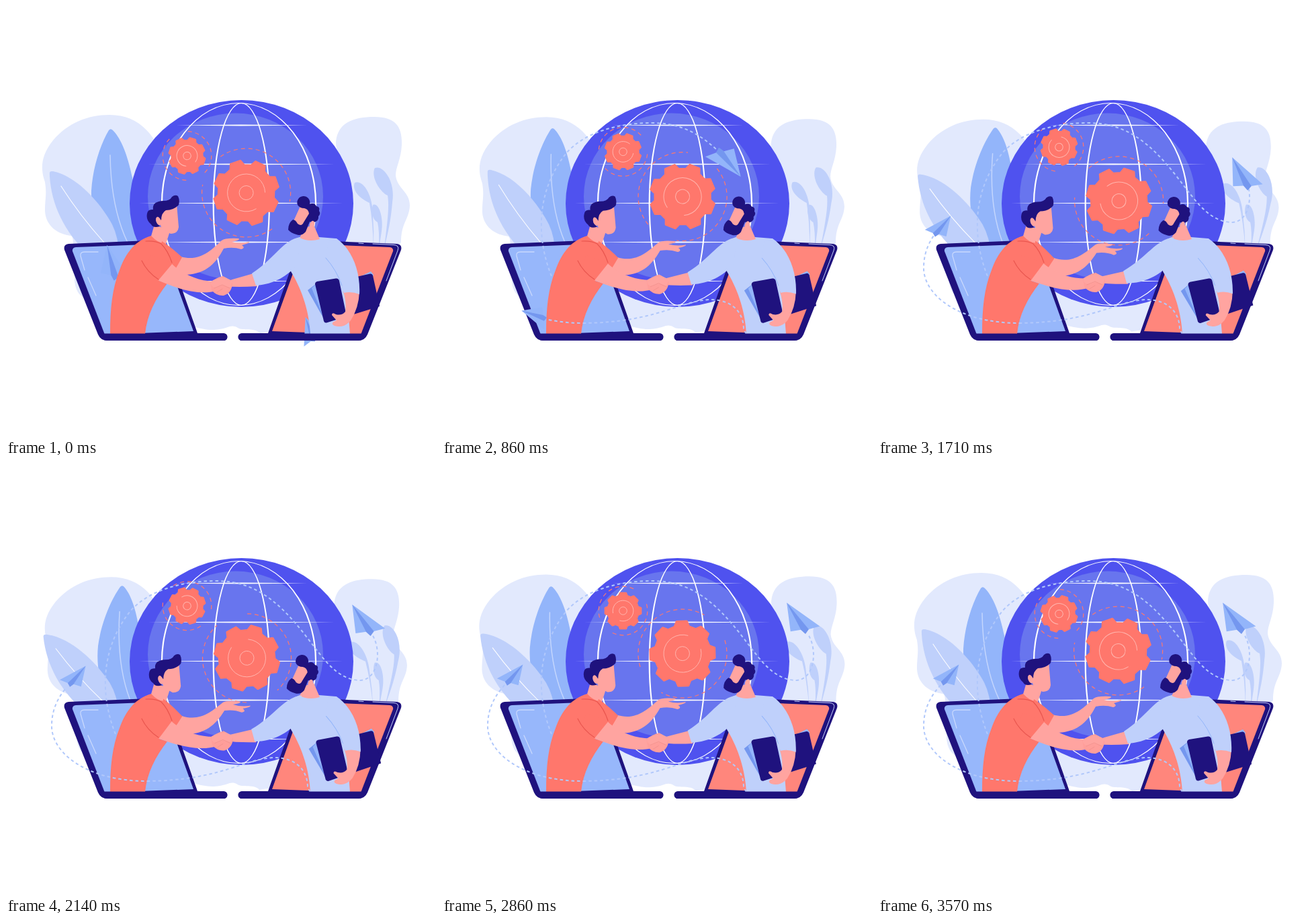
Write an HTML page that moves like this. It is 640 px wide and 640 px high and loops after 3.64 s.

```html
<!DOCTYPE html>
<html lang="en">
<head>
<meta charset="utf-8">
<title>Online deal</title>
<style>
  html, body { margin: 0; width: 100%; height: 100%; overflow: hidden; background: #fff; }
  svg { display: block; width: 100vw; height: 100vh; }
  .line { fill: none; stroke-linecap: round; }
  .navy { fill: #1f127e; }
  .coral { fill: #ff776c; }
  .skin { fill: #ffa4a0; }
  .pale { fill: #bfd0fb; }
  .blue { fill: #93b5fa; }
  .trail { fill: none; stroke: #b1c8fb; stroke-width: 2; }
  .gear path, .gear circle { vector-effect: non-scaling-stroke; }
</style>
</head>
<body>
<svg viewBox="0 0 640 640">
  <defs>
    <path id="lid" d="M93 354L236 348L285 487H324a5.500 5.500 0 0 1 0 11H151Q141 498 137 489L87 363Q85 355 93 354Z"/>
    <path id="screen" d="M104 359L232 354L279 484L147 489L99 365Q98 360 104 359Z"/>
    <path id="base" d="M140 487.500H324a5.300 5.300 0 0 1 0 10.600H151Q142 498 140 487.500Z"/>
    <g id="plane">
      <path class="blue" d="M48 0L10 -20L3 -6L-5 -4L-3 4L-9 20Z"/>
      <path fill="#7497ef" d="M48 0L3 -6L-6 -4L-3 4Z"/>
    </g>
  </defs>

  <path id="backdrop" fill="#e2e9fd" d="M154 162C200 162 226 195 238 240H480C505 240 490 215 491 202C494 172 520 165 548 165C582 165 590 182 589 207C588 228 580 240 580 252C582 272 601 276 601 297C600 318 588 322 588 352L540 400L500 470L378 487C370 478 352 484 345 479C335 473 330 480 318 481C302 484 292 480 280 478L120 436C104 430 101 415 102 395Q106 375 100 360C100 350 100 344 97 342C78 340 59 328 58 305C58 285 61 282 58 262C52 245 50 225 70 200C92 174 122 162 154 162Z"/>

  <g id="tallLeaf">
    <path class="blue" d="M153 185Q156 181 160 186C182 209 200 280 200 400H185C148 365 126 325 127 275C129 240 141 205 153 185Z"/>
    <path class="line" stroke="#c4d6fd" stroke-width="1.500" d="M155 222Q156 300 181 352"/>
  </g>
  <g id="wideLeaf">
    <path class="pale" d="M65 249Q65 245 70 246C105 253 140 292 158 325Q168 345 168 372H125C84 335 66 290 65 249Z"/>
    <path class="line" stroke="#fff" d="M82 268Q110 312 146 352"/>
  </g>
  <path id="sprigA" class="pale" d="M549 241C562 236 580 262 575 292C573 318 569 335 563 360C567 325 571 300 568 282C558 278 542 255 549 241Z"/>
  <path id="sprigB" class="pale" d="M519 263C532 258 546 282 546 310Q548 335 547 360Q546 320 541 293C530 288 514 276 519 263Z"/>
  <path id="sprigC" class="pale" d="M546 296C556 292 562 318 559 335Q557 350 555 360Q556 335 553 322C545 318 543 304 546 296Z"/>

  <ellipse cx="350.500" cy="294" rx="166.500" ry="154" fill="#4f52ef"/>
  <ellipse cx="341.500" cy="283.500" rx="130.500" ry="124" fill="#6875ee"/>
  <g id="grid" fill="#fff" fill-rule="evenodd"></g>

  <g id="bigGear" class="gear"></g>
  <g id="smallGear" class="gear"></g>

  <use href="#lid" class="navy"/>
  <use href="#screen" fill="#97b7fb"/>
  <path class="line" stroke="#c9d9fd" stroke-width="1.300" d="M137 366H117Q110 366 111 372L117 393M122 404L134 431"/>
  <g transform="matrix(-1 0 0 1 675 0)">
    <use href="#lid" class="navy"/>
    <use href="#screen" fill="#ff867c"/>
  </g>
  <path class="line" stroke="#c4cffb" d="M525 353L532 353.500M546 354L577 355.500Q586 356 583 364L566 409"/>

  <path id="trailA" class="trail" d="M163 402C140 345 140 275 185 219C212 188 262 174 313 174C370 174 405 205 440 248C470 285 490 322 528 322C552 320 558 285 549 262Q540 240 512 205"/>
  <use id="planeA" href="#plane"/>

  <!-- left man -->
  <path class="skin" d="M221 325L215 346Q222 356 238 354L244 335Z"/>
  <g id="leftHead">
    <path class="skin" d="M229 302L254 294L257 329Q256 339 245 339L232 332L226 315Z"/>
    <path class="navy" d="M210 309Q211 302 219 303Q217 291 234 290Q244 290 247 284Q252 280 256 283Q259 289 257 296Q250 304 238 304Q231 308 231 319L226 314Q222 316 224 322L229 328Q219 331 216 325Q208 319 210 309Z"/>
    <ellipse class="skin" cx="227" cy="320" rx="3.500" ry="6.500" transform="rotate(-20 227 320)"/>
  </g>
  <g id="farArm">
    <path class="skin" d="M260 373C288 381 305 364 321 349Q326 345 346 346Q350 348 336 351Q348 354 362 351Q363 353 351 356Q357 360 350 362Q338 358 324 361C310 388 292 402 256 400L246 392Z"/>
    <path class="coral" d="M232 350Q246 359 262 374L252 392L228 385Z"/>
  </g>
  <path class="coral" d="M216 342Q226 353 236 353Q246 362 252 380L228 409L240 413C222 436 210 460 207 488H155C155 450 158 420 169 393C178 368 192 349 216 342Z"/>
  <g id="nearArm">
    <path class="skin" d="M246 383C262 399 285 409 309 410L313 424C290 430 262 424 226 408Z"/>
    <path class="coral" d="M215 370L248 383L227 408L208 394Z"/>
  </g>
  <path class="line" stroke="#e9564f" stroke-width="1.200" d="M202 379Q210 396 227 407M208 350Q222 349 231 354Q241 364 247 382"/>
  <use href="#base" class="navy"/>

  <path id="trailB" class="trail" d="M456 496L449 480C448 450 425 437 400 437C355 438 320 471 210 472C120 472 68 430 68 390C68 360 82 340 98 324L120 299"/>
  <use id="planeB" href="#plane"/>

  <!-- right man -->
  <path class="pale" d="M437 344Q452 352 466 344L491 346C510 365 508 410 508 440L512 488H453C451 450 438 418 424 395L420 352Z"/>
  <path class="skin" d="M445 330L437 345Q451 352 467 347L458 326Z"/>
  <g id="rightHead">
    <path class="skin" d="M438 298L452 303L456 316L440 330L428 320Z"/>
    <path class="navy" d="M434 296A9.500 9.500 0 1 1 452 295Q459 292 462 298Q468 299 466 305Q469 309 465 313Q466 320 458 322L452 321L446 336Q440 343 432 340Q424 338 420 333Q420 323 427 318Q431 318 434 324Q440 329 443 322L451 309Q450 302 444 301Q437 301 434 296Z"/>
    <ellipse class="skin" cx="455.500" cy="325" rx="3.500" ry="5.500" transform="rotate(20 455 325)"/>
  </g>
  <g id="reach">
    <path class="skin" d="M372 397L330 409L326 417Q345 419 374 417Z"/>
    <path class="pale" d="M438 344C412 348 400 376 366 398L372 416C400 414 418 402 434 385Z"/>
  </g>
  <g id="shake">
    <path fill="#ff9e9a" d="M304 411Q314 404 323 402Q333 407 337 413Q336 427 324 431Q314 432 306 423Z"/>
    <path class="skin" d="M305 410Q315 404 326 404L337 409L334 419L322 416L312 420Q303 417 305 410Z"/>
    <path class="line" stroke="#f08d89" stroke-width=".700" d="M310 420L322 415L333 420M314 426L322 421"/>
  </g>
  <g id="hold">
    <path class="blue" d="M518 407L543 395L547 400L530 440Z"/>
    <path class="navy" d="M522 403L542 398.500Q545 398 546 401L556 447L514 460L510 420Z"/>
    <path fill="#7497ef" d="M449 423L462 413L475 469Z"/>
    <path class="blue" d="M455 420L462 413L475 469Z"/>
    <path class="navy" d="M463 410L491 405.500Q495 405 496 409L507 462L477 471.500Q474 472 473 469L460 414Q460 411 463 410Z"/>
    <path class="skin" d="M502 425H526Q525 450 513 468Q503 480 489 476Q481 472 492 468L485 460Q485 455 491 459Q500 461 505 455Q507 441 502 425Z"/>
    <path class="pale" d="M480 346H492C515 362 528 395 526 429Q514 424 503 427C500 405 490 385 476 375Z"/>
    <path class="line" stroke="#93b5fa" d="M476 375Q492 393 500 416"/>
  </g>
  <use href="#base" class="navy" transform="matrix(-1 0 0 1 675 0)"/>
</svg>
<script>
const $ = id => document.getElementById(id);
const TAU = 2 * Math.PI, LOOP = 3640;

// Angles run clockwise in degrees from twelve o'clock.
const polar = (r, deg) => {
  const a = (deg - 90) * TAU / 360;
  return `${(r * Math.cos(a)).toFixed(2)} ${(r * Math.sin(a)).toFixed(2)}`;
};
const arc = (r, from, to) =>
  `M${polar(r, from)}A${r} ${r} 0 ${to - from > 180 ? 1 : 0} 1 ${polar(r, to)}`;

function gearMarkup() {
  const corners = [[41.5, -15], [48.5, -9], [48.5, 9], [41.5, 15]];
  let body = '';
  for (let tooth = 0; tooth < 8; tooth++)
    for (const [r, a] of corners) body += (body ? 'L' : 'M') + polar(r, tooth * 45 + a);
  return `<path class="coral" stroke="#ff776c" stroke-width="3" stroke-linejoin="round" d="${body}Z"/>
    <path class="line" stroke="#ffb5ae" d="${arc(28, 168, 468)}"/>
    <circle r="10.500" fill="none" stroke="#ffb5ae"/>
    <path fill="none" stroke="#ff776c" stroke-width="1.200" stroke-dasharray="6 5"
      d="${arc(66, -16, 121)}${arc(66, 164, 300)}"/>`;
}
$('bigGear').innerHTML = $('smallGear').innerHTML = gearMarkup();

// Globe lines: meridians thin at the poles, latitudes tapered at both ends.
const oval = (cx, rx, ry) =>
  `M${cx - rx} 295a${rx} ${ry} 0 1 1 ${2 * rx} 0a${rx} ${ry} 0 1 1 ${-2 * rx} 0`;
const meridian = (cx, rx) => oval(cx, rx + 1.2, 151) + oval(cx, rx - 1, 150);
const latitude = (half, i) => {
  const y = 177.5 + i * 58;
  return `M${350 - half} ${y}L350 ${y - 1}L${350 + half} ${y}L350 ${y + 1}Z`;
};
$('grid').innerHTML =
  [meridian(346.5, 114.5), meridian(350.3, 41.5), ...[98, 139, 152, 139, 98].map(latitude)]
    .map(d => `<path d="${d}"/>`).join('');

const move = (id, transform) => $(id).setAttribute('transform', transform);
const turn = (id, deg, x, y) => move(id, `rotate(${deg} ${x} ${y})`);

const flightTimes = [0, .14, .24, .34, .41, .48, .56, .64];
const flightParts = [0, .365, .64, .868, .93, .966, .99, 1];
function flown(p) {
  const k = flightTimes.findIndex(time => time > p);
  if (k < 0) return 1;
  const x = (p - flightTimes[k - 1]) / (flightTimes[k] - flightTimes[k - 1]);
  return flightParts[k - 1] + x * (flightParts[k] - flightParts[k - 1]);
}

// The tail and nose both follow the trail; dashes appear behind the tail.
function fly(trailId, planeId, size, scale, part) {
  const trail = $(trailId);
  const done = (trail.getTotalLength() - size) * part;
  const tail = trail.getPointAtLength(done), nose = trail.getPointAtLength(done + size);
  const deg = Math.atan2(nose.y - tail.y, nose.x - tail.x) * 360 / TAU;
  trail.setAttribute('stroke-dasharray', '4.5 4 '.repeat(done / 8.5) + '0 9999');
  move(planeId, `translate(${tail.x} ${tail.y}) rotate(${deg}) scale(${scale})`);
}

function draw(ms) {
  const p = Math.min(50, Math.floor(ms / 71.4 + .07)) / 50;
  const sway = (1 - Math.cos(TAU * p)) / 2;
  const lag = Math.cos(TAU * (p - .17)) - .5;

  move('backdrop', `translate(320 400) scale(${1 - .016 * sway} ${1 - .029 * sway}) translate(-320 -400)`);
  turn('tallLeaf', 5 * sway, 190, 400);
  turn('wideLeaf', 3.2 * lag, 164, 372);
  turn('sprigA', 7 * sway, 560, 370);
  turn('sprigB', 3.2 * lag, 547, 370);
  turn('sprigC', -1.5 * lag, 555, 370);

  move('bigGear', `translate(${357.6 + sway} ${278 + 12 * sway}) rotate(${360 * p - 19.5})`);
  move('smallGear', `translate(269.5 ${223 - 13 * sway}) rotate(${18 - 360 * p}) scale(.55)`);

  move('leftHead', `translate(${3.5 * sway} ${1.5 * sway})`);
  turn('farArm', 4.5 * sway, 240, 380);
  turn('nearArm', -3.2 * sway, 230, 395);
  move('rightHead', `translate(${-2.5 * sway} ${sway})`);
  turn('reach', 3.2 * sway, 430, 380);
  move('shake', `translate(${sway} ${-5 * sway})`);
  turn('hold', -1.5 * sway, 495, 355);

  const part = flown(p);
  fly('trailA', 'planeA', 50, '1', part);
  fly('trailB', 'planeB', 34, '.72 -.76', part);
}

const start = performance.now();
(function tick() {
  draw((performance.now() - start) % LOOP);
  requestAnimationFrame(tick);
})();
</script>
</body>
</html>
```
